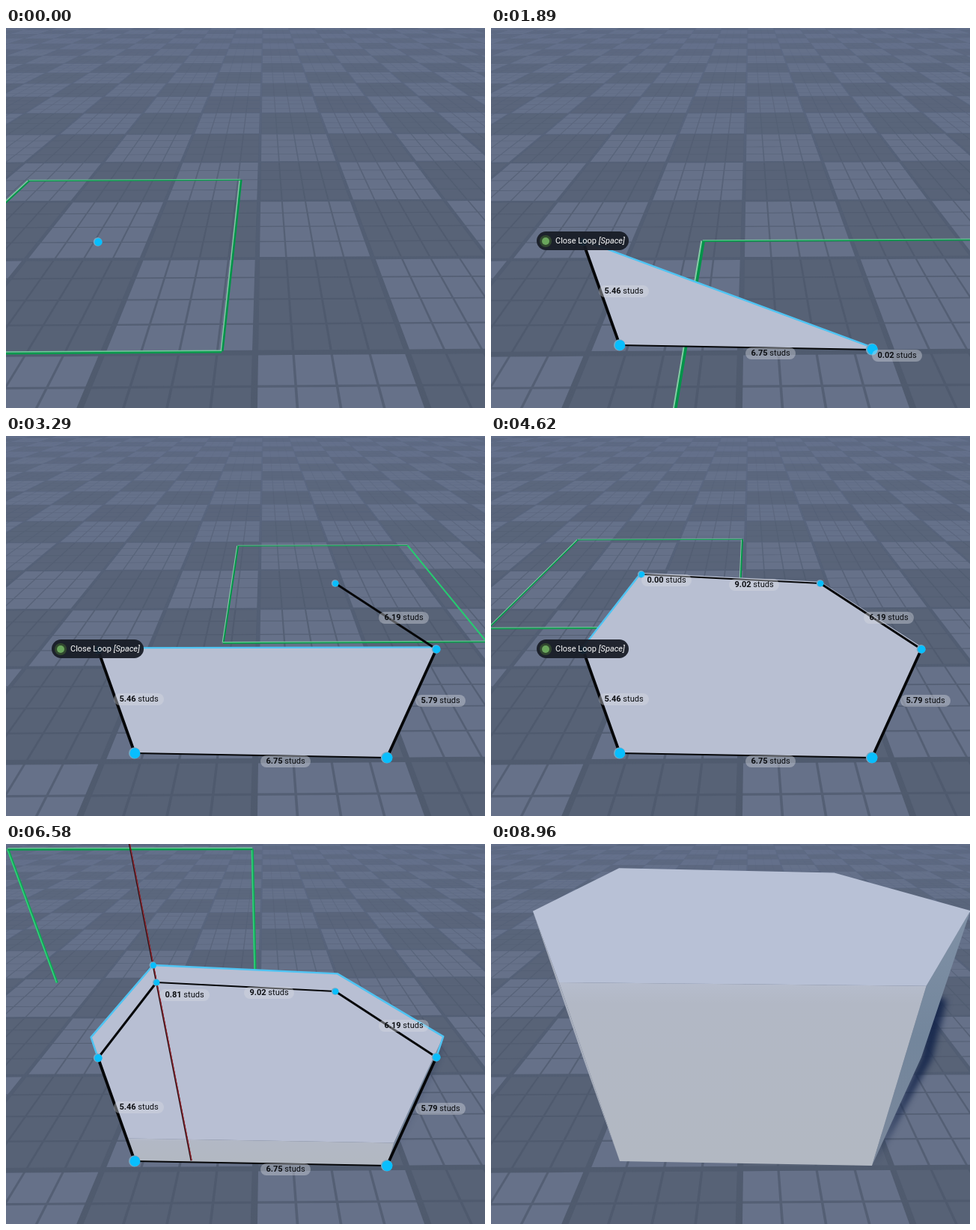
Write an HTML page with a canvas that moves like this. It is 640 px wide and 508 px high and loops after 9030 ms.

```html
<!DOCTYPE html>
<html lang="en">
<head>
<meta charset="utf-8">
<title>Polygon extrusion</title>
<style>
  html, body { margin: 0; width: 100%; height: 100%; overflow: hidden; background: #5f6b83; }
  #stage { position: relative; width: 640px; height: 508px; overflow: hidden; font: 11px/16px Roboto, Arial, sans-serif; }
  canvas { display: block; }
  .label, #close { position: absolute; left: 0; top: 0; white-space: pre; visibility: hidden; }
  .label { height: 16px; padding: 0 7.5px; border-radius: 8px; background: rgba(214, 217, 224, .4); color: #0c0e12; }
  #close { left: 61px; top: 272px; width: 123px; height: 25px; border-radius: 12.5px; background: rgba(24, 28, 38, .94); color: #fff; line-height: 25px; }
  #close span { position: absolute; left: 25px; }
  #close::before { content: ""; position: absolute; left: 7px; top: 7.5px; width: 10px; height: 10px; border-radius: 50%; background: #6aa65c; box-shadow: 0 0 0 3px #31482f; }
</style>
</head>
<body>
<div id="stage">
  <canvas id="view" width="640" height="508"></canvas>
  <div id="close"><span>Close Loop <i>[Space]</i></span></div>
</div>
<script>
const W = 640, H = 508, LOOP = 9030, TICK = 70;
const stage = document.getElementById('stage');
const view = document.getElementById('view');
const closePill = document.getElementById('close');
const ctx = view.getContext('2d');

// Camera: floor point (s, u) plus height h in studs, projected to the screen
const VX = 345, VY = -88;            // vanishing point of the floor
const NX = 351, NY = 953;            // vanishing point of verticals
const RISE = 0.0001169, TILT = 0.000013;
const CELL_S = 0.39, CELL_U = 0.0006096, S0 = -0.023, U0 = 0.0019157;
const HALF_S = 0.4845, HALF_U = 0.000758;
const THICK = 0.09;                  // height of the flat face

function toFloor([x, y]) {
  const s = (x - VX) / (y - VY);
  return { s, u: 1 / (y - VY) - TILT * s };
}
function project(s, u, h = 0) {
  const d = 1 / (u + TILT * s), r = h * RISE * d;
  return [(VX + s * d - NX * r) / (1 - r), (VY + d - NY * r) / (1 - r)];
}
const lift = (p, h) => project(p.s, p.u, h);

const lerp = (a, b, k) => a + (b - a) * k;
const mix = (a, b, k) => a.map((v, i) => lerp(v, b[i], k));
const clamp = v => Math.max(0, Math.min(1, v));
const smooth = k => k * k * (3 - 2 * k);
const rgb = c => `rgb(${c.map(Math.round).join(',')})`;

function poly(c, pts, fill) {
  c.beginPath();
  pts.forEach(p => c.lineTo(p[0], p[1]));
  c.closePath();
  c.fillStyle = fill;
  c.fill();
}
function line(pts, color, width) {
  ctx.beginPath();
  pts.forEach(p => ctx.lineTo(p[0], p[1]));
  ctx.strokeStyle = color;
  ctx.lineWidth = width;
  ctx.stroke();
}

// ---- floor, painted once ----
function paintFloor() {
  const cv = document.createElement('canvas');
  cv.width = W; cv.height = H;
  const c = cv.getContext('2d');
  const haze = [99, 112, 140];
  const g = c.createLinearGradient(0, 0, 0, H);
  g.addColorStop(0, rgb([94, 107, 134]));
  g.addColorStop(0.4, rgb([83, 95, 117]));
  g.addColorStop(1, rgb([79, 90, 109]));
  c.fillStyle = g;
  c.fillRect(0, 0, W, H);
  const quad = (col, row, x0, x1, y0, y1, color) => {
    const at = (x, y) => project(S0 + (col + x) * CELL_S, U0 + (row + y) * CELL_U);
    poly(c, [at(x0, y0), at(x1, y0), at(x1, y1), at(x0, y1)], color);
  };
  const edge = 0.02, thin = 0.008;
  for (let row = -1; row < 18; row++) {
    const fog = clamp(row / 13) * 0.6, fade = clamp((row - 1) / 10) * 0.75;
    for (let col = -12; col < 12; col++) {
      const light = (col + row) & 1;
      const tile = mix(light ? [102, 113, 137] : [87, 98, 118], haze, fog);
      const seam = mix(mix(light ? [84, 95, 116] : [79, 90, 110], haze, fog), tile, fade);
      quad(col, row, edge, 1 - edge, edge, 1 - edge, rgb(seam));
      for (let i = 0; i < 4; i++) for (let j = 0; j < 4; j++) {
        const lo = k => k ? k / 4 + thin : edge;
        const hi = k => k < 3 ? (k + 1) / 4 - thin : 1 - edge;
        quad(col, row, lo(i), hi(i), lo(j), hi(j), rgb(tile));
      }
    }
  }
  return cv;
}
const floor = paintFloor();

// ---- scene data ----
const SPOTS = [[123, 286], [172, 424], [509, 430], [575, 285], [440, 197], [201, 185], [165, 247]];
const P = SPOTS.map(toFloor);
const BASE = P.slice(0, 6);
const LENGTHS = [5.46, 6.75, 5.79, 6.19, 9.02, 4.54];
const PLACED = [210, 840, 1820, 2520, 3360, 4200];
// cursor legs: departure and arrival
const LEGS = [[210, 800], [970, 1760], [1870, 2400], [2520, 3080], [3360, 4060], [4620, 5440]];
const CLOSED = 5530, DONE = 8960;
const HEIGHTS = [[6020, 0], [6370, 0.74], [6510, 0.81], [6580, 0.91], [6790, 2.1], [7070, 3.9], [7280, 4.72], [7630, 4.86], [7700, 4.86], [8190, 5.1], [8470, 5.2]];

function heightAt(t) {
  let [t0, h0] = HEIGHTS[0];
  for (const [t1, h1] of HEIGHTS) {
    if (t < t1) return t1 === t0 ? h0 : lerp(h0, h1, clamp((t - t0) / (t1 - t0)));
    [t0, h0] = [t1, h1];
  }
  return h0;
}
function cursorAt(t) {
  let p = SPOTS[0];
  LEGS.forEach(([a, b], i) => {
    if (t > a) p = mix(SPOTS[i], SPOTS[i + 1], smooth(clamp((t - a) / (b - a))));
  });
  return toFloor(p);
}
const across = (a, b) => (a.s - b.s) / 0.097;
const along = (a, b) => (a.u - b.u) / 0.000151;
const span = (a, b) => Math.hypot(across(a, b), along(a, b));

// ---- labels ----
const labels = LENGTHS.map(() => {
  const el = document.createElement('div');
  el.className = 'label';
  el.innerHTML = '<b></b> studs';
  stage.appendChild(el);
  return el;
});
function setLabel(i, value, [x, y]) {
  labels[i].firstChild.textContent = value.toFixed(2);
  labels[i].style.transform = `translate(${Math.round(x)}px,${Math.round(y)}px)`;
  labels[i].style.visibility = 'visible';
}
const midpoint = (a, b) => project((a.s + b.s) / 2, (a.u + b.u) / 2);

// ---- drawing parts ----
const shift = (pts, dx, dy) => pts.map(([x, y]) => [x + dx, y + dy]);

// a thin beam: lit top, and a darker face below or, left of centre, to the right
function crossEdge(a, b, depth) {
  const w = depth / 190;
  line(shift([a, b], 0, w * 0.3), '#0b9a4d', w);
  line(shift([a, b], 0, -w * 0.4), '#6fcb9b', w * 0.55);
}
function sideEdge(a, b, depth) {
  const w = depth / 120;
  if (a[0] + b[0] > 2 * VX) return line([a, b], '#25cd70', w * 0.85);
  line(shift([a, b], w * 0.25, 0), '#04934a', w);
  line(shift([a, b], -w * 0.35, 0), '#86cca6', w * 0.45);
}
function floorSquare(p) {
  const near = p.u - HALF_U, far = p.u + HALF_U, l = p.s - HALF_S, r = p.s + HALF_S;
  const a = project(l, far), b = project(r, far), c = project(r, near), d = project(l, near);
  const mid = 1 / p.u;
  sideEdge(a, d, mid);
  sideEdge(b, c, mid);
  crossEdge(a, b, 1 / far);
  crossEdge(d, c, 1 / near);
}
function wallSquare(p, h) {
  const l = p.s - HALF_S, r = p.s + HALF_S, low = Math.max(0, h - 5), high = h + 5;
  const a = project(l, p.u, high), b = project(r, p.u, high);
  const post = (foot, head) => {
    line([foot, head], '#0fa556', 3.4);
    line(shift([foot, head], -0.8, 0), '#36cf7c', 1.6);
  };
  post(project(l, p.u, low), a);
  post(project(r, p.u, low), b);
  crossEdge(a, b, 480);
}
function blackEdge(a, b) {
  const depth = 2 / (a.u + b.u), slant = Math.abs(along(a, b)) / (span(a, b) || 1);
  line([lift(a), lift(b)], '#050608', Math.max(2, depth * 0.0095 * (0.4 + 0.6 * slant)));
}
function disc(x, y, r, color) {
  ctx.beginPath();
  ctx.arc(x, y, r, 0, 7);
  ctx.fillStyle = color;
  ctx.fill();
}
function handle(p, h = 0) {
  const [x, y] = lift(p, h), r = 1.2 + 0.0125 / p.u;
  disc(x - 0.4, y - 0.1, r, '#78a9c4');
  disc(x + 0.4, y + 0.2, r - 0.7, '#08befd');
}
const SKY = '#4fc4f3', FACE = '#b8bfd2';

function slab(points) {
  poly(ctx, points.map(p => lift(p)), FACE);
  poly(ctx, points.map(p => lift(p, THICK)), FACE);
}

function solid(h) {
  const low = BASE.map(p => lift(p)), top = BASE.map(p => lift(p, Math.max(h, THICK)));
  if (h > THICK) {
    const k = Math.min(1, h / 5.2);
    ctx.filter = 'blur(4px)';
    poly(ctx, [low[2], mix(low[3], [589, 287], k), mix(low[3], [609, 209], k), mix(low[3], [590, 200], k), low[3]], 'rgba(16,34,72,.85)');
    ctx.filter = 'none';
    const side = ctx.createLinearGradient(0, top[3][1], 0, low[2][1]);
    side.addColorStop(0, '#8091a6');
    side.addColorStop(0.5, '#73869c');
    side.addColorStop(1, '#7a879b');
    poly(ctx, [low[0], low[1], top[1], top[0]], '#a8afbd');
    poly(ctx, [low[2], low[3], top[3], top[2]], side);
    const front = ctx.createLinearGradient(0, top[1][1], 0, low[1][1]);
    front.addColorStop(0, '#b6bdcd');
    front.addColorStop(0.12, '#b2b8c5');
    front.addColorStop(1, '#b2b8c2');
    poly(ctx, [low[1], low[2], top[2], top[1]], front);
    poly(ctx, top, rgb(mix([184, 191, 210], [184, 193, 214], clamp(h / 5))));
  } else {
    slab(BASE);
  }
  return [low, top];
}

function drawing(t) {
  const cursor = cursorAt(t);
  const count = PLACED.filter(p => t >= p).length;
  const fixed = BASE.slice(0, count);
  floorSquare(cursor);
  if (count > 2) {
    slab(fixed);
    line([lift(fixed[0], THICK), lift(fixed[count - 1], THICK)], SKY, 2.4);
    closePill.style.visibility = 'visible';
  }
  for (let i = 0; i < count; i++) {
    const a = P[i], live = i === count - 1, b = live ? cursor : P[i + 1];
    blackEdge(a, b);
    setLabel(i, live ? LENGTHS[i] * span(a, b) / span(a, P[i + 1]) : LENGTHS[i], midpoint(a, b));
  }
  fixed.forEach(p => handle(p));
  handle(cursor);
}

function extruding(t) {
  const h = heightAt(t), pivot = BASE[5];
  wallSquare(pivot, h);
  const [low, top] = solid(h);
  line([low[0], top[0], top[5], top[4], top[3], low[3]], SKY, 2.4);
  for (let i = 0; i < 5; i++) {
    blackEdge(P[i], P[i + 1]);
    setLabel(i, LENGTHS[i], midpoint(P[i], P[i + 1]));
  }
  const a = lift(pivot, h + 15), b = lift(pivot, h - 15);
  line([a, b], '#2a1014', 2.2);
  line(shift([a, b], 0.6, 0), '#a02a34', 1.1);
  if (h > 0) {
    blackEdge(P[5], P[0]);
    const [x, y] = lift(pivot, h / 2), push = clamp((2 - h) / 1.1);
    setLabel(5, heightAt(t - TICK), [x + 2 + 4 * push, y + 21 * push]);
  } else {
    setLabel(5, LENGTHS[5], midpoint(P[5], P[6]));
  }
  BASE.forEach(p => handle(p));
  handle(pivot, h);
}

function frame(now) {
  const t = Math.floor((now % LOOP) / TICK) * TICK;
  ctx.drawImage(floor, 0, 0);
  closePill.style.visibility = 'hidden';
  labels.forEach(el => { el.style.visibility = 'hidden'; });
  ctx.lineJoin = 'round';
  if (t < CLOSED) drawing(t);
  else if (t < DONE) extruding(t);
  else solid(heightAt(t));
}

const start = performance.now();
function loop() {
  frame(performance.now() - start);
  requestAnimationFrame(loop);
}
loop();
</script>
</body>
</html>
```
